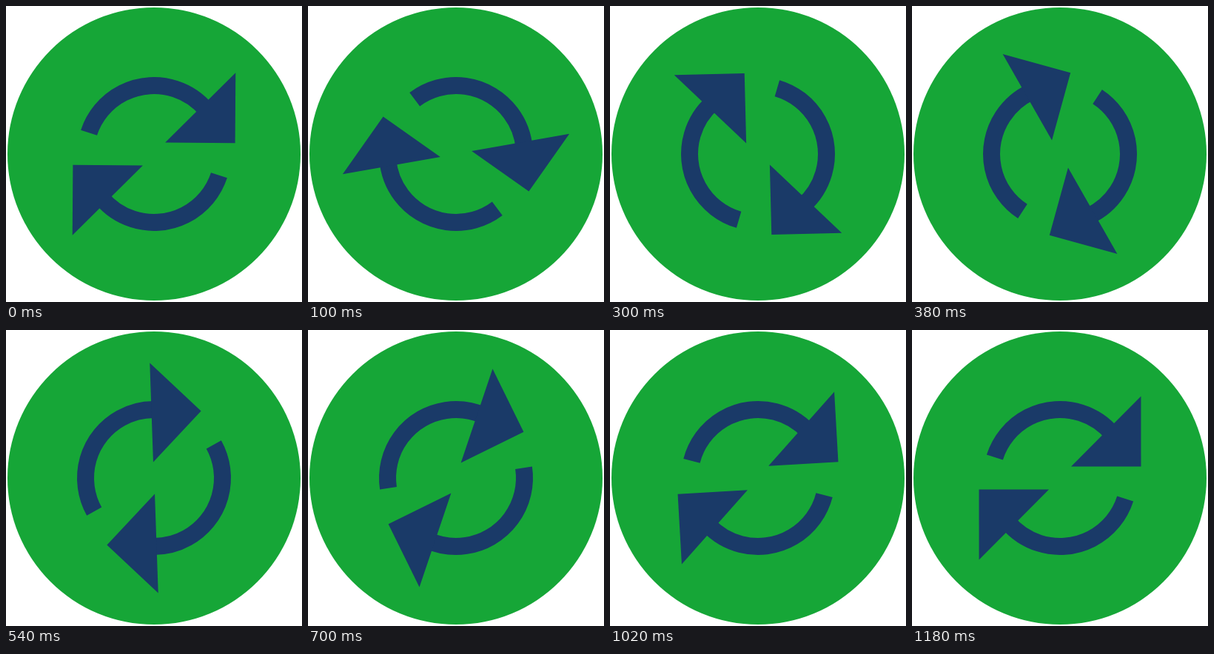
Recreate the animation shown at these times as an HTML page with a canvas. Size 400 by 400 pixels, loop 1200 ms.

```html
<!DOCTYPE html>
<html lang="en">
<head>
<meta charset="utf-8">
<title>Rotating arrows</title>
<style>
  html, body { margin: 0; width: 100%; height: 100%; overflow: hidden; background: #fff; }
  canvas { display: block; width: 400px; height: 400px; }
</style>
</head>
<body>
<canvas id="stage" width="400" height="400"></canvas>
<script>
const ctx = document.getElementById("stage").getContext("2d");
const LOOP = 1200;
const GREEN = "#16a637";
const NAVY = "#1a3a68";
const RAD = Math.PI / 180;

// Cubic Bezier easing, solved for its parameter by bisection.
function bezierEase(x1, y1, x2, y2) {
  const curve = (a, b, s) =>
    3 * a * s * (1 - s) ** 2 + 3 * b * s * s * (1 - s) + s ** 3;
  return u => {
    let low = 0, high = 1;
    for (let i = 0; i < 30; i++) {
      const mid = (low + high) / 2;
      if (curve(x1, x2, mid) < u) low = mid; else high = mid;
    }
    return curve(y1, y2, (low + high) / 2);
  };
}

const ease = bezierEase(0.19, 0.49, 0.538, 1);

function drawArrow() {
  ctx.beginPath();
  ctx.arc(0, 0, 92.5, 197.7 * RAD, 320 * RAD);
  ctx.stroke();
  ctx.beginPath();
  ctx.moveTo(109.5, -110.5);
  ctx.lineTo(109.5, -15.5);
  ctx.lineTo(15, -15.5);
  ctx.fill();
}

function draw(time) {
  ctx.setTransform(1, 0, 0, 1, 0, 0);
  ctx.fillStyle = "#fff";
  ctx.fillRect(0, 0, 400, 400);

  ctx.translate(200, 200);
  ctx.fillStyle = GREEN;
  ctx.beginPath();
  ctx.arc(0, 0, 198, 0, 2 * Math.PI);
  ctx.fill();

  ctx.fillStyle = ctx.strokeStyle = NAVY;
  ctx.lineWidth = 23;
  ctx.rotate(Math.PI * ease((time % LOOP) / LOOP));
  drawArrow();
  ctx.rotate(Math.PI);
  drawArrow();
}

const start = performance.now();
function tick() {
  draw(performance.now() - start);
  requestAnimationFrame(tick);
}
tick();
</script>
</body>
</html>
```
